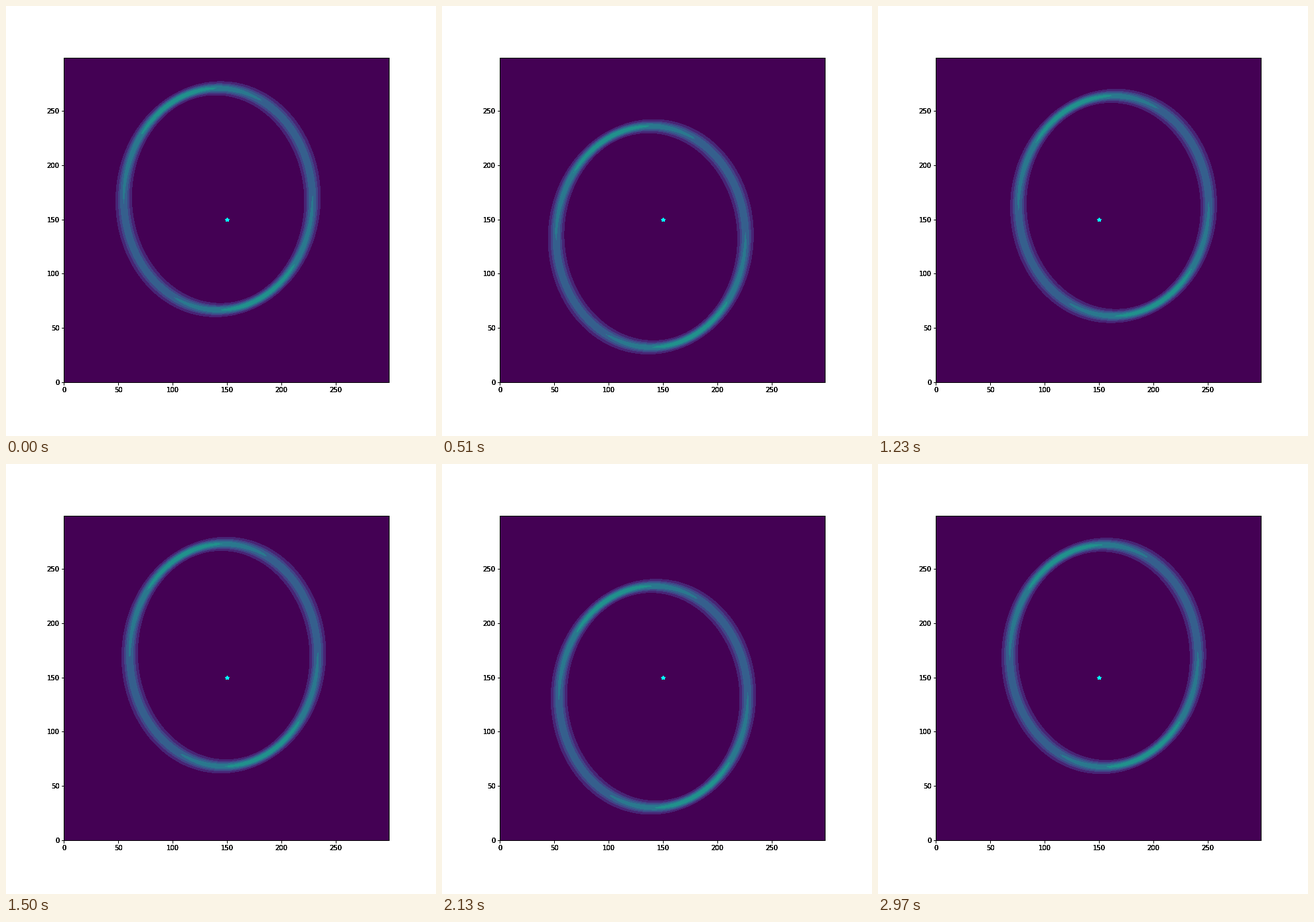
Write a matplotlib script that moves like this. It is 648 px wide and 648 px high and loops after 3000 ms.

```python
import numpy as np
import matplotlib.pyplot as plt
from matplotlib.animation import FuncAnimation

FRAMES, STEP_MS = 100, 30
SIZE = 300
LEVELS = np.arange(0.05, 0.7, 0.1)

# orbit of the ring around the star
CENTER = np.array([149.5, 150.2])
ORBIT = np.array([17.4, 20.5])
AXES = np.array([87.4, 101.6])
PULSE = np.array([0.85, -0.85])
START, RATE = np.radians(116), np.radians(6.84)

# blur, elongated along one direction
WIDE, THIN, TILT, FLUX = 4.0, 2.45, np.radians(30), 1.3

plt.rcParams.update({"font.family": "DejaVu Sans", "font.size": 10})
cmap = plt.get_cmap("viridis")
colors = [cmap(0.1 * (k + 1)) for k in range(len(LEVELS) - 1)]
xs, ys = np.meshgrid(np.arange(SIZE), np.arange(SIZE))


def ring(i):
    """Brightness of the blurred elliptical ring at step i."""
    t = START + RATE * i
    cx, cy = CENTER + ORBIT * (np.cos(t), np.sin(t))
    a, b = AXES + PULSE * np.cos(2 * t)
    x, y = xs - cx + 1e-9, ys - cy + 1e-9
    rho = np.hypot(x / a, y / b)
    gx, gy = x / a**2, y / b**2
    dist = (rho - 1) * rho / np.hypot(gx, gy)
    angle = np.arctan2(gy, gx) - TILT
    sigma = np.hypot(WIDE * np.cos(angle), THIN * np.sin(angle))
    return FLUX / sigma * np.exp(-0.5 * (dist / sigma) ** 2)


def add_layer():
    ax = fig.add_axes([0.125, 0.125, 0.775, 0.755])
    ax.set(xlim=(0, SIZE - 1), ylim=(0, SIZE - 1), aspect="equal",
           xticks=range(0, 251, 50), yticks=range(0, 251, 50))
    ax.plot(150, 150, "*", color="cyan", ms=6, mew=1, zorder=5)
    return ax


fig = plt.figure(figsize=(9, 9), dpi=72, facecolor="white")
base = add_layer()
base.set_facecolor(cmap(0.0))

# stacked copies harden the edges of text, ticks and marker
for _ in range(3):
    add_layer().patch.set_visible(False)

shown = []


def update(i):
    while shown:
        shown.pop().remove()
    shown.append(base.contourf(xs, ys, ring(i), levels=LEVELS, colors=colors))
    base.set(xlim=(0, SIZE - 1), ylim=(0, SIZE - 1))
    return shown


anim = FuncAnimation(fig, update, frames=FRAMES, interval=STEP_MS,
                     init_func=lambda: update(0), repeat=True,
                     repeat_delay=0, blit=False)
plt.show()
```
